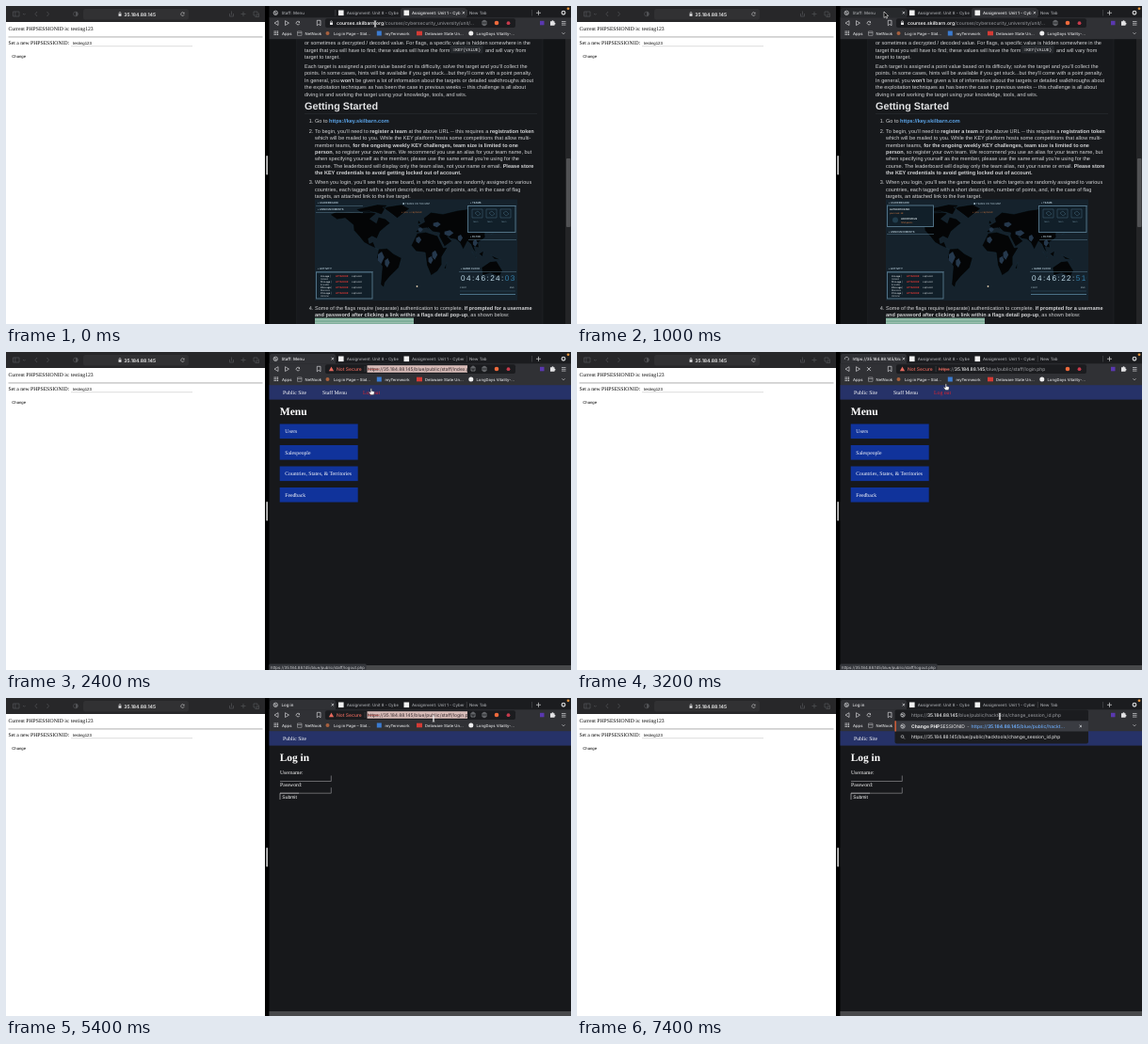
Recreate the animation shown at these times as an HTML page. Size 600 by 338 pixels, loop 8 s.

```html
<!DOCTYPE html>
<html lang="en">
<head>
<meta charset="utf-8">
<title>Session demo</title>
<style>
  html, body { margin: 0; width: 100%; height: 100%; overflow: hidden; background: #000; }
  svg { display: block; }
  #stage { width: 100vw; height: 100vh; }
  text { white-space: pre; text-rendering: geometricPrecision; }
  .ui { font-family: Inter, Roboto, sans-serif; }
  .serif { font-family: "Liberation Serif", serif; }
  .sans { font-family: "Liberation Sans", sans-serif; }
  .mono { font-family: "Liberation Mono", monospace; }
</style>
</head>
<body>
<svg id="stage" viewBox="0 0 600 338"></svg>
<script>
const LOOP = 8000, STEP = 200;
const HOST = "35.184.88.145";

// ---- drawing helpers: *word* makes bold text ----
const rich = s => s.replace(/&/g, "&amp;")
  .replace(/\*([^*]+)\*/g, '<tspan font-weight="700">$1</tspan>');
const text = (x, y, s, size, fill, font = "ui", more = "") =>
  `<text class="${font}" x="${x}" y="${y}" font-size="${size}" fill="${fill}" ${more}>${rich(s)}</text>`;
const rect = (x, y, w, h, fill, more = "") =>
  `<rect x="${x}" y="${y}" width="${w}" height="${h}" fill="${fill}" ${more}/>`;
const dot = (x, y, r, fill, more = "") =>
  `<circle cx="${x}" cy="${y}" r="${r}" fill="${fill}" ${more}/>`;
const line = (d, color, width = 0.7) =>
  `<path d="${d}" fill="none" stroke="${color}" stroke-width="${width}"/>`;
const fillPath = (d, color, more = "") => `<path d="${d}" fill="${color}" ${more}/>`;
const clip = (x, y, w, h, body) =>
  `<svg x="${x}" y="${y}" width="${w}" height="${h}" viewBox="${x} ${y} ${w} ${h}" overflow="hidden">${body}</svg>`;
// spans: "from-to,from-to" in ms
const during = (spans, body) => `<g data-on="${spans}">${body}</g>`;

const globe = (x, y) => dot(x, y, 2.2, "none", 'stroke="#d5d6d8" stroke-width=".7"') +
  line(`M${x - 1.8} ${y - .5}h2l1 1.5M${x - .5} ${y + 2}l.8-1.4`, "#d5d6d8", .8);
const cross = (x, y, r, color = "#d0d1d4") =>
  line(`M${x - r} ${y - r}l${2 * r} ${2 * r}m0-${2 * r}l-${2 * r} ${2 * r}`, color, .8);
const reload = (x, y, color) =>
  line(`M${x + 1.5} ${y - 1}a1.8 1.8 0 1 0 .2 1.6`, color, .7) +
  fillPath(`M${x + 2} ${y - 2.2}v1.8h-1.8z`, color);
const lock = (x, y) => rect(x - 1.5, y - .4, 3, 2.5, "#e4e4e6", 'rx=".4"') +
  line(`M${x - .9} ${y - .3}v-1a.9.9 0 0 1 1.8 0v1`, "#e4e4e6", .6);

// ---- left window ----
function leftWindow() {
  const dim = "#525356";
  return rect(0, 0, 275, 338, "#fff") + rect(0, 0, 275, 17, "#272729") +
    line("M7.500 6h6.500v5h-6.500zM9.800 6v5M18 8l1.300 1.300L20.600 8M33 6l-2 2.500 2 2.500M43.500 6l2 2.500-2 2.500", dim) +
    dot(74, 8.5, 2.4, "none", `stroke="${dim}" stroke-width=".7"`) +
    fillPath("M74 6.100a2.400 2.400 0 0 1 0 4.800z", dim) +
    rect(82, 3, 112, 11.5, "#313133", 'rx="2.5"') + lock(121, 8.7) +
    text(125.3, 10.5, HOST, 5.1, "#f2f2f2", "ui", 'font-weight="600"') + reload(187.5, 8.6, "#b5b5b7") +
    line("M237.500 8v3h4v-3M239.500 9.500v-4M249.500 8.500h5M252 6v5M263 6h4v4h-4zM264.500 11.500h4v-4", dim) +
    text(2.5, 26.2, "Current PHPSESSIONID is: testing123", 5.7, "#000", "serif") +
    rect(2.5, 32.6, 270, .7, "#8c8c8c") +
    text(2.5, 41.2, "Set a new PHPSESSIONID:", 5.7, "#000", "serif") +
    text(71, 41.3, "testing123", 4.3, "#000", "sans") + rect(69, 42.6, 129, .5, "#bbb") +
    text(6.3, 54.6, "Change", 4.2, "#000", "sans") +
    rect(275, 0, 4.5, 338, "#000") + rect(276.3, 159, 1.7, 20.5, "#c9c9c9", 'rx=".8"');
}

// ---- assignment page; coastlines in degrees of longitude and latitude ----
const AMERICAS = "M-168 66L-156 71-128 70-95 72-82 68-94 59-82 52-78 62-65 59-56 52-66 45-75 38-81 26-90 30-97 26" +
  "-95 18-88 21-83 10-78 8-95 15-105 20-114 30-124 40-125 49-140 60-155 58Z" +
  "M-120 75L-80 83-62 82-72 66-85 70-110 69ZM-70 78L-35 83-20 76-43 60-53 67Z" +
  "M-78 9L-62 10-50 1-35-6-40-22-58-38-66-47-68-55-74-50-71-20-81-5Z";
const EURASIA = "M-9 38L0 44-4 48 8 54 6 60 20 70 42 67 70 73 105 77 140 73 180 69 163 60 160 52 156 60 140 56" +
  " 130 42 127 35 120 38 121 28 108 20 109 11 100 13 104 2 98 9 94 17 88 22 80 8 73 20 66 25 57 26 50 30" +
  " 59 22 45 13 35 30 36 36 27 37 23 38 14 45 18 40 12 44 3 43-5 36Z";
const SOUTH = "M-6 35L10 37 32 31 43 11 51 12 40-4 40-17 32-28 20-35 12-18 9 3-8 5-17 15Z" +
  "M114-22L130-12 142-11 153-27 147-38 131-31 116-35Z" +
  "M-5 50L1 52-4 58ZM131 33L141 37 143 43 139 37ZM44-24L49-13 48-24Z" +
  "M96 5L105-6 102-4ZM109 1L118 6 116-4ZM131-1L150-9 138-8ZM167-46L178-38 172-42Z";
// highlighted countries: longitude, latitude, width, height
const SPOTS = [[-79, 0, 12, 16], [-66, -10, 9, 12], [-8, 27, 10, 9], [22, 3, 10, 12],
  [15, -6, 9, 10], [45, 38, 17, 8], [70, 30, 9, 9], [24, 52, 14, 7], [-4, 43, 9, 6], [98, 22, 9, 9]];

function gameMap() {
  const pale = "#b3cad6", edge = "#587a8f", tiny = 2.7;
  const label = (x, y, w, s) => text(x, y, s, tiny, pale, "ui", 'font-weight="600"') +
    rect(x - 2, y + 2, w, .5, edge);
  const box = (x, y, w, h) => rect(x, y, w, h, "#111f29", `stroke="${edge}" stroke-width=".9"`);
  const events = ["Ireland", "Ecuador", "Morocco", "Ukraine"].map((place, i) => {
    const y = 288 + i * 6;
    return text(334, y, `*${4 + i * 9} m ago* |`, 2.4, "#d0d6da") +
      text(350, y, "*ATTACKER*", 2.5, "#de3935") + text(367, y, "captured", 2.5, "#d0d6da") +
      text(334, y + 2.7, place, 2.4, "#c5cdd2");
  }).join("");
  const tiles = [0, 1, 2].map(i =>
    line(`M${495 + i * 15} 216h11v9h-11zM${498 + i * 15} 220l3-2 3 3-3 2z`, "#3d5d70", .6) +
    text(496 + i * 15, 230, "team", 2.3, "#6b8a9b")).join("");
  const land = fillPath(AMERICAS + EURASIA + SOUTH, "#040506", 'stroke="#1b3342" stroke-width=".7"') +
    SPOTS.map(([x, y, w, h]) => fillPath(
      `M${x} ${y}l${w * .6} ${h * .3} ${w * .4}-${h * .6}-${w * .5}-${h * .7}-${w * .5} ${h * .4}z`, "#25384c")).join("");
  return rect(328, 205.5, 215, 107.5, "#15222c") +
    clip(328, 205.5, 215, 107.5, `<g transform="translate(440 264) scale(.57 -.64)">${land}</g>` +
      dot(436.5, 298, .9, "#d9c5aa")) +
    text(421, 210.5, "● TEAMS ON THE MAP", 2.6, pale) +
    text(420, 220, "▪ you  ▪ captured", 2.6, "#b66b3b") +
    during("0-600", label(331, 210.2, 50, "▪ LEADERBOARD") + label(331, 217, 50, "▪ ANNOUNCEMENTS")) +
    during("600-1200", label(331, 210.2, 50, "▪ LEADERBOARD") + box(329.5, 212, 49, 22.5) +
      text(332, 217, "*AUTHENTICATED*", 2.5, "#cfdae0") + text(332, 220.5, "your rank: 38", 2.3, "#db7f44") +
      dot(338, 227.5, 3, "#213d4d") + text(344, 227, "*ANONYMOUS*", 2.5, "#cfdae0") +
      text(344, 230.5, "1250 points", 2.3, "#db7f44") + label(331, 240.5, 50, "▪ ANNOUNCEMENTS")) +
    label(493, 210.2, 51, "▪ TEAMS") + box(490.5, 212.5, 50.5, 28) + tiles +
    label(493, 246, 51, "▪ FILTER") + label(331, 280, 61, "▪ ACTIVITY") +
    box(329.5, 283, 59.5, 28) + events +
    label(483, 280, 61, "▪ GAME CLOCK") +
    `<text class="sans" x="483" y="292" font-size="8.2" fill="#bfdbe8" letter-spacing="1.4"><tspan id="clock"></tspan><tspan id="ticks" fill="#327da8"></tspan></text>` +
    text(482, 300, "START", 2.2, pale) + text(535, 300, "END", 2.2, pale) +
    line("M482 306.500h59", "#4b7187", 1.2) + line("M482 303h59", "#31536a", .5);
}

// [x, baseline, words]
const COPY = [
  [317, 41.2, "or sometimes a decrypted / decoded value. For flags, a specific value is hidden somewhere in the"],
  [317, 48.7, "target that you will have to find; these values will have the form"],
  [509, 48.7, "and will vary from"],
  [317, 56.2, "target to target."],
  [317, 65.6, "Each target is assigned a point value based on its difficulty; solve the target and you'll collect the"],
  [317, 73.1, "points. In some cases, hints will be available if you get stuck...but they'll come with a point penalty."],
  [317, 80.6, "In general, you *won't* be given a lot of information about the targets or detailed walkthroughs about"],
  [317, 88.1, "the exploitation techniques as has been the case in previous weeks -- this challenge is all about"],
  [317, 95.6, "diving in and working the target using your knowledge, tools, and wits."],
  [328, 124.3, "Go to"],
  [328, 134.8, "To begin, you'll need to *register a team* at the above URL -- this requires a *registration token*"],
  [328, 142.2, "which will be mailed to you. While the KEY platform hosts some competitions that allow multi-"],
  [328, 149.6, "member teams, *for the ongoing weekly KEY challenges, team size is limited to one*"],
  [328, 157, "*person*, so register your own team. We recommend you use an alias for your team name, but"],
  [328, 164.4, "when specifying yourself as the member, please use the same email you're using for the"],
  [328, 171.7, "course. The leaderboard will display only the team alias, not your name or email. *Please store*"],
  [328, 179, "*the KEY credentials to avoid getting locked out of account.*"],
  [328, 189.3, "When you login, you'll see the game board, in which targets are randomly assigned to various"],
  [328, 196.7, "countries, each tagged with a short description, number of points, and, in the case of flag"],
  [328, 204, "targets, an attached link to the live target."],
  [328, 322.6, "Some of the flags require (separate) authentication to complete. *If prompted for a username*"],
  [328, 330, "*and password after clicking a link within a flags detail pop-up*, as shown below:"]
];

function assignmentPage() {
  const ink = "#d2d3d5", size = 5.57;
  const numbers = [124.3, 134.8, 189.3, 322.6].map((y, i) => text(321.8, y, `${i + 1}.`, size, ink, "sans"));
  return rect(279.5, 35, 320.5, 303, "#121416") + rect(309, 35, 261, 303, "#17191c") +
    line("M308.700 35v303M570 35v303", "#222428", .7) +
    rect(594, 35, 6, 303, "#242527") + rect(595, 162, 4.5, 73, "#515254", 'rx="1"') +
    clip(280, 35, 290, 303, COPY.map(([x, y, s]) => text(x, y, s, size, ink, "sans")).join("")) +
    rect(471.5, 41.7, 35, 8.6, "#25282c", 'rx="1.5"') +
    text(474.5, 48.2, "=KEY{VALUE}", 4.5, "#e2e2e4", "mono") +
    text(317, 110, "*Getting Started*", 10.8, "#e2e3e5", "sans") + rect(317, 114, 247, .6, "#2b2e32") +
    text(343, 124.3, "*https://key.skilbarn.com*", 5.6, "#5ba4e8", "sans") + numbers.join("") +
    gameMap() + rect(328, 331.5, 105, 7, "#7fae9a") +
    line("M328 333.500h105M328 336.500h105", "#a2c4b4", .8);
}

// ---- site pages ----
function sitePage(body) {
  return rect(279.5, 35, 320.5, 303, "#17181b") + rect(279.5, 35, 320.5, 15.6, "#263268") +
    text(294, 44.6, "Public Site", 5.75, "#fff", "serif") + rect(279.5, 333, 320.5, 5, "#48494b") + body;
}
function menuPage() {
  const items = ["Users", "Salespeople", "Countries, States, & Territories", "Feedback"];
  return sitePage(text(336, 44.6, "Staff Menu", 5.75, "#fff", "serif") +
    text(379, 44.6, "Log out", 5.75, "#e0242f", "serif") +
    text(290.7, 66.8, "*Menu*", 11.6, "#fff", "serif") +
    items.map((s, i) => rect(290.7, 76.5 + i * 22.5, 83, 15.6, "#10339b") +
      text(296.3, 86.2 + i * 22.5, s, 5.7, "#fff", "serif")).join(""));
}
function loginPage() {
  return sitePage(text(290.7, 66.8, "*Log in*", 11.4, "#fff", "serif") +
    text(291, 81.2, "Username:", 5.7, "#fff", "serif") + text(291, 93.8, "Password:", 5.7, "#fff", "serif") +
    line("M291 88.500h54.300v-6M291 101.200h54.300v-6", "#8b8c8e", .7) +
    line("M291 108v-6.800h20", "#b9babc", .7) + text(293.3, 106.5, "Submit", 5, "#fff", "sans"));
}

// ---- browser chrome ----
const BAR = "#303135";
const tabText = (x, w, s, fill = "#a5a7ab") => clip(x, 2, w, 10, text(x, 8.9, s, 4.4, fill, "ui", 'font-weight="500"'));
const tabShape = (x, w, fill) =>
  fillPath(`M${x} 12.500v-8q0-2.500 2.500-2.500h${w - 5}q2.500 0 2.500 2.500v8z`, fill) + cross(x + w - 3.2, 7.2, 1.2);

function tabs() {
  const white = "#ececee";
  return rect(279.5, 0, 320.5, 13, "#1b1c1f") +
    during("600-1200", tabShape(280, 70, "#27292c")) +
    during("0-1200", tabShape(419, 70, BAR)) + during("1200-8000", tabShape(280, 70, BAR)) +
    during("0-3000,3800-8000", globe(286.3, 7.3)) +
    during("3000-3800", line("M284.300 7.800a2.100 2.100 0 1 1 3.300 1.300", "#b7b8bc", .8)) +
    during("0-1200", tabText(292.5, 52, "Staff: Menu")) +
    during("1200-3000", tabText(292.5, 50, "Staff: Menu", white)) +
    during("3000-3800", tabText(292.5, 51, `https://${HOST}/blue/public`, white)) +
    during("3800-8000", tabText(292.5, 50, "Log in", white)) +
    rect(353, 4.5, 5.6, 5.6, "#f2f2f2") + rect(422.5, 4.5, 5.6, 5.6, "#f2f2f2") +
    tabText(361.7, 55, "Assignment: Unit 8 - Cybersecurity") +
    during("0-1200", tabText(431, 51.5, "Assignment: Unit 1 - Cybersecurity", white)) +
    during("1200-8000", tabText(431, 55.5, "Assignment: Unit 1 - Cybersecurity")) +
    tabText(492, 30, "New Tab") +
    during("0-1200", line("M349.700 4v6.500", "#56585c", .5)) +
    line("M489.300 4v6.500M558.500 4v6.500", "#56585c", .5) +
    line("M563 7.300h5M565.500 4.800v5", "#d6d7d9", .7) +
    dot(592, 7.2, 1.8, "none", 'stroke="#c9cacc" stroke-width="1.300"') + dot(597, 2.8, 1.4, "#e3923c");
}

const secureUrl = path => text(383.8, 20, `https://${HOST}`, 5, "#a0a2a6").replace("https://" + HOST,
  `<tspan fill="#e5695d" text-decoration="line-through">https</tspan>://<tspan fill="#f1f1f2" font-weight="500">${HOST}</tspan>${path}`);
const pickedUrl = path => rect(383.5, 14.2, 106.5, 7.6, "#d8bcb8") +
  clip(383.5, 13, 106.5, 10, text(383.8, 20, `https://${HOST}${path}`, 5, "#30262a")) +
  line("M384 18.300h12.500", "#b33b36", .6) +
  line("M494 16v4h4v-4zM496 18.500v-4", "#a9abaf", .6);
const reader = line("M506 16h4v4h-4zM508 14.800v6.400", "#a9abaf", .6);

function suggestions() {
  const url = `https://${HOST}/blue/public/hacktools/change_session_id.php`;
  return rect(337.5, 12.5, 205.5, 36, "#1b1c1f", 'rx="2"') + rect(337.5, 24.3, 205.5, 11.2, "#3a3c42") +
    rect(337.5, 24.3, 1.3, 11.2, "#ec6539") + globe(346, 18) + globe(346, 30) +
    `<text class="ui" x="355" y="20" font-size="5" fill="#9b9da2">https://<tspan fill="#f3f3f4" font-weight="500">${HOST}</tspan>${url.split(HOST)[1]}</text>` +
    text(355, 32, "*Change PHP*SESSIONID", 5, "#f1f1f2") + text(414.3, 32, "-", 5, "#c2c3c5") +
    clip(418, 25, 107, 10, text(418.5, 32, `https://*${HOST}*/blue/public/hackt...`, 5, "#6aa7f2", "ui", 'font-weight="500"')) +
    cross(534.8, 30, 1.2) + dot(345.5, 41, 1.4, "none", 'stroke="#b7b8bb" stroke-width=".700"') +
    line("M346.500 42l1.500 1.500", "#b7b8bb") + text(355, 43, url, 5, "#f1f1f2");
}

function toolbar() {
  const icon = "#d1d2d5";
  const marks = ["Apps", "NetNook", "Log in Page – Slat...", "myTermwork", "Delaware State Un...", "LongDays Vitality-..."];
  const markX = [293, 317.5, 348, 402.5, 445, 499.5];
  return rect(279.5, 12.3, 320.5, 22.9, BAR) +
    line("M289 15.700v4.800l-4-2.400zM296.500 15.700v4.800l4-2.400z", icon) +
    during("0-3000,3800-8000", reload(310, 18.1, icon)) + during("3000-3800", cross(310, 18.1, 2, icon)) +
    line("M330.300 15.300h3.700v5.500l-1.800-1.500-1.900 1.500z", icon) +
    rect(339, 13.3, 202, 9.6, "#1b1c1f", 'rx="2"') +
    during("0-1200", lock(345.5, 18) + reader + clip(351, 13, 146, 10,
      text(351, 20, "/", 5, "#9b9da2").replace(">/<",
        '><tspan fill="#f1f1f2" font-weight="600">courses.skilbarn.org</tspan>/courses/cybersecurity_university/unit/…<'))) +
    during("1200-7000", fillPath("M345.500 15.500l2.600 4.800h-5.200z", "#e5695d") +
      text(351, 20, "Not Secure", 5, "#e5695d", "ui", 'font-weight="500"') + rect(380.8, 15, .5, 6, "#55575b")) +
    during("1200-2800", pickedUrl("/blue/public/staff/index.php") + reader) +
    during("2800-3000", secureUrl("/blue/public/staff/index.php")) +
    during("3000-4600", secureUrl("/blue/public/staff/login.php")) +
    during("4600-7000", pickedUrl("/blue/public/staff/login.php") + reader) +
    dot(521, 18, 2.3, "#ef6a3c") + dot(533.5, 18.2, 1.9, "#c73a4c") + rect(567, 15.8, 4.5, 4.5, "#5a38b0") +
    fillPath("M578 16.300h1.500a1 1 0 0 1 2 0h1v1.500a1 1 0 0 1 0 2v1h-4.500z", "#e3e3e5") +
    line("M590 16.500h4.500M590 18.300h4.500M590 20.100h4.500", icon, .7) +
    [0, 1, 2].map(c => [0, 1, 2].map(r => rect(284.6 + c * 1.7, 26.5 + r * 1.7, 1.1, 1.1, icon)).join("")).join("") +
    line("M309.500 27h4.500v4.300h-4.500zM309.500 28.500h4.500", "#a8aaad", .6) +
    dot(341.5, 29, 2, "#a8613f") + rect(393.8, 26.5, 5, 5, "#3b7bd0") + rect(436, 26.7, 6, 4.6, "#d43b35") +
    dot(493.8, 29, 2.5, "#efeff0") +
    marks.map((s, i) => text(markX[i], 30.6, s, 4.2, "#e1e2e4", "ui", 'font-weight="500"')).join("") +
    line("M590.500 28.300l1.500 1.500 1.500-1.500", icon) + during("7000-8000", suggestions());
}

// ---- pointer: [time, x, y, shape], one pose per step ----
const POSES = [
  [0, 392, 19, "beam"], [200, 387, 18, "beam"], [400, 366, 14, "beam"], [600, 343, 10, "arrow"],
  [800, 329, 9, "arrow"], [1000, 327, 9, "arrow"], [1400, 333, 14, "arrow"], [1600, 350, 25, "arrow"],
  [1800, 371, 36, "arrow"], [2000, 385, 41, "hand"], [2200, 388, 42, "hand"], [2600, 390, 41, "hand"],
  [3000, 392, 38, "hand"], [3200, 392, 37, "hand"], [3600, 396, 36, "hand"], [3800, 440, 27, "arrow"],
  [4000, 483, 20, "beam"], [4200, 497, 18, "beam"], [4800, 489, 18, "beam"], [5000, 480, 19, "beam"],
  [5200, 464, 21, "beam"], [5400, 454, 22, "beam"], [5600, 453, 26, "arrow"], [5800, 456, 24, "arrow"],
  [6000, 460, 18.5, "beam"], [6200, 455, 18.5, "beam"], [6400, 449, 19.5, "beam"]
];
const POINTERS = {
  arrow: fillPath("M-1-3v6.500l1.600-1.400 1 2.100 1-.500-1-2 2-.200z", "#000", 'stroke="#fff" stroke-width=".600"'),
  beam: line("M-1.200-3.300q1.200 0 1.200 1v4.600q0 1-1.200 1M1.200-3.300q-1.200 0-1.200 1v4.600q0 1 1.200 1", "#f4f4f4", .8),
  hand: fillPath("M-.800-3q.800-.700 1.200 0v2.400l2.400.600q.600.300.400 1.200l-.700 2.300h-3.200l-2-2.700q.200-.900 1-.400l.900.700z",
    "#fff", 'stroke="#222" stroke-width=".400"')
};

const stage = document.getElementById("stage");
stage.innerHTML = rect(0, 0, 600, 338, "#000") + leftWindow() +
  during("0-1200", assignmentPage()) + during("1200-3800", menuPage()) + during("3800-8000", loginPage()) +
  during("2000-3800", rect(279.5, 331.5, 103, 6.5, "#34363b", 'rx="1"') +
    text(281, 336.5, `https://${HOST}/blue/public/staff/logout.php`, 4.3, "#d2d3d6")) +
  tabs() + toolbar() + '<g id="pointer"></g>';

const parts = [...stage.querySelectorAll("[data-on]")].map(node => ({
  node, spans: node.dataset.on.split(",").map(s => s.split("-").map(Number))
}));
const [pointer, clock, ticks] = ["pointer", "clock", "ticks"].map(id => document.getElementById(id));
let shown = -1;

function render(t) {
  if (t === shown) return;
  shown = t;
  for (const { node, spans } of parts)
    node.style.display = spans.some(([a, b]) => t >= a && t < b) ? "" : "none";
  const [, x, y, shape] = POSES.filter(p => p[0] <= t).pop();
  pointer.setAttribute("transform", `translate(${x} ${y})`);
  pointer.innerHTML = POINTERS[shape];
  const [sec, rest] = Math.max(0, 24.03 - 1.52 * t / 1000).toFixed(2).split(".");
  clock.textContent = `04:46:${sec.padStart(2, "0")}:`;
  ticks.textContent = rest;
}

const start = performance.now();
function tick() {
  const t = (performance.now() - start) % LOOP;
  render(Math.floor(t / STEP) * STEP);
  requestAnimationFrame(tick);
}
tick();
</script>
</body>
</html>
```
